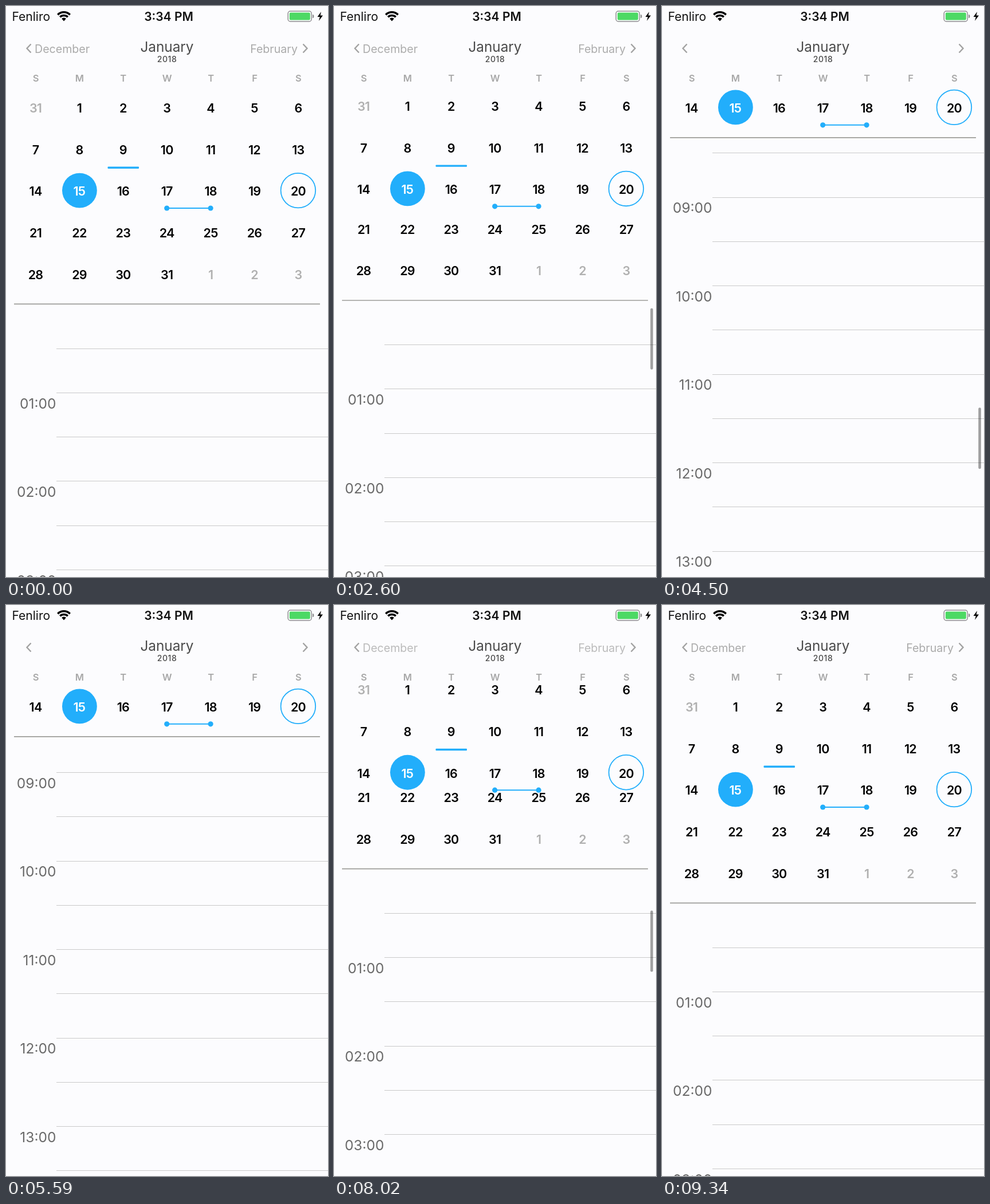
An HTML page with a canvas that plays this animation: 562 by 997 pixels, repeating every 9.41 s.

```html
<!DOCTYPE html>
<html lang="en">
<head>
<meta charset="utf-8">
<title>Collapsing calendar</title>
<style>
  html, body { margin: 0; height: 100%; overflow: hidden; background: #fcfcfe; }
  canvas { display: block; width: 562px; height: 997px; }
</style>
</head>
<body>
<canvas id="stage" width="562" height="997"></canvas>
<script>
const ctx = document.getElementById('stage').getContext('2d');
const LOOP = 9410;
const BG = '#fcfcfe', BLUE = '#22aefb', MUTED = '#aaaaaa';
const COL_X = 51.5, COL_W = 76.4;
const ROW_Y = 176.9, ROW_H = 72.6;
const GRID_TOP = 140, DIVIDER_Y = 520.3, COLLAPSE = 4 * ROW_H;
const HALF_HOUR = 77.25;
const SELECTED_ROW = 2;

const clamp = (v, lo, hi) => Math.min(hi, Math.max(lo, v));
const colX = col => COL_X + col * COL_W;

// Accelerating drag followed by exponential deceleration towards a limit.
function flick(t, from, limit, drag, tau) {
  const glide = (limit - from) / (1 + drag / (2 * tau));
  return t < drag
    ? from + glide * t * t / (2 * tau * drag)
    : limit - glide * Math.exp(-(t - drag) / tau);
}

function scrollAt(t) {
  if (t < 2600) return 0;
  if (t < 6380) return flick(Math.min(t, 5420) - 2600, 6.3, 1626.6, 280, 500);
  if (t < 9210) return Math.max(0, flick(t - 6380, 1612, -4.6, 200, 475));
  return 0;
}

function indicatorAlpha(t) {
  if (t < 2600) return 0;
  if (t < 6380) return clamp((5590 - t) / 160, 0, 1);
  return clamp((9340 - t) / 120, 0, 1);
}

function text(str, x, yMid, size, weight, color, align = 'center', spacing = 0) {
  ctx.font = `${weight} ${size}px Inter, sans-serif`;
  ctx.letterSpacing = spacing + 'px';
  ctx.textAlign = align;
  ctx.fillStyle = color;
  ctx.fillText(str, x, yMid + size * 0.3635);
}

function line(points, width, color) {
  ctx.beginPath();
  points.forEach(([x, y]) => ctx.lineTo(x, y));
  ctx.lineWidth = width;
  ctx.strokeStyle = color;
  ctx.stroke();
}

function circle(x, y, r) {
  ctx.beginPath();
  ctx.arc(x, y, r, 0, Math.PI * 2);
}

function disc(x, y, r, color) {
  circle(x, y, r);
  ctx.fillStyle = color;
  ctx.fill();
}

function box(x, y, w, h, r, color) {
  ctx.beginPath();
  ctx.roundRect(x, y, w, h, r);
  ctx.fillStyle = color;
  ctx.fill();
}

function drawStatusBar() {
  text('Fenliro', 10.5, 18.5, 21, 400, '#111', 'left');
  text('3:34 PM', 284, 18.5, 21, 600, '#111');

  const a0 = -Math.PI * 0.75, a1 = -Math.PI * 0.25;
  ctx.strokeStyle = ctx.fillStyle = '#000';
  ctx.lineWidth = 3.5;
  for (const r of [15.2, 9.6]) {
    ctx.beginPath();
    ctx.arc(101, 26, r, a0, a1);
    ctx.stroke();
  }
  ctx.beginPath();
  ctx.moveTo(101, 26.5);
  ctx.arc(101, 26, 5.5, a0, a1);
  ctx.fill();

  ctx.beginPath();
  ctx.roundRect(492.2, 9, 41, 18, 4);
  ctx.lineWidth = 1.5;
  ctx.strokeStyle = '#8e8e90';
  ctx.stroke();
  box(494.8, 11.5, 36, 13, 2, '#4cd964');
  box(535, 15, 2.4, 6, [0, 2, 2, 0], '#8e8e90');

  ctx.beginPath();
  [[550, 10], [543.5, 19], [547.8, 19], [546, 26], [553, 16.5], [548.6, 16.5]]
    .forEach(([x, y]) => ctx.lineTo(x, y));
  ctx.fillStyle = '#000';
  ctx.fill();
}

function drawHeader(collapse) {
  line([[43.5, 66.5], [36.5, 74], [43.5, 81.5]], 2.4, '#a2a2a2');
  line([[518.5, 66.5], [525.5, 74], [518.5, 81.5]], 2.4, '#a2a2a2');
  ctx.globalAlpha = 1 - collapse / COLLAPSE;
  text('December', 50, 74.5, 19.6, 400, MUTED, 'left');
  text('February', 509, 74.5, 19.6, 400, MUTED, 'right');
  ctx.globalAlpha = 1;
  text('January', 281, 71, 24.3, 400, '#4a4a4a');
  text('2018', 281, 93, 14, 500, '#4a4a4a', 'center', 0.6);
  [...'SMTWTFS'].forEach((day, col) => text(day, colX(col) + 0.5, 126.5, 16.5, 600, '#a8a8a8'));
}

function drawMarks(row, y) {
  if (row === 1) box(177.5, y + 31.1, 54.5, 3.4, 1, BLUE);
  if (row !== SELECTED_ROW) return;
  disc(colX(1) + 0.5, y, 30.4, BLUE);
  circle(colX(6), y, 30.3);
  ctx.lineWidth = 1.8;
  ctx.strokeStyle = BLUE;
  ctx.stroke();
  line([[colX(3), y + 30.9], [colX(4), y + 30.9]], 2, BLUE);
  disc(colX(3), y + 30.9, 4.6, BLUE);
  disc(colX(4), y + 30.9, 4.6, BLUE);
}

function drawWeek(row, y) {
  drawMarks(row, y);
  for (let col = 0; col < 7; col++) {
    const n = row * 7 + col;
    const inMonth = n >= 1 && n <= 31;
    const day = inMonth ? n : n < 1 ? 31 : n - 31;
    const color = n === 15 ? '#fff' : inMonth ? '#000' : '#b0b0b0';
    text(day, colX(col), y + 1.5, 21.5, 600, color, 'center', -0.8);
  }
}

function drawGrid(collapse) {
  ctx.save();
  ctx.beginPath();
  ctx.rect(0, GRID_TOP, 562, DIVIDER_Y - collapse - GRID_TOP);
  ctx.clip();
  const rowY = row => ROW_Y + row * ROW_H - collapse * (row > SELECTED_ROW ? 1 : 0.5);
  drawWeek(3, rowY(3));
  drawWeek(4, rowY(4));
  // Later weeks slide underneath the opaque upper weeks.
  ctx.fillStyle = BG;
  ctx.fillRect(0, 0, 562, rowY(SELECTED_ROW) + 35);
  for (let row = 0; row <= SELECTED_ROW; row++) drawWeek(row, rowY(row));
  ctx.restore();
}

function drawTimeline(scroll, top) {
  ctx.save();
  ctx.beginPath();
  ctx.rect(0, top, 562, 997 - top);
  ctx.clip();
  for (let i = 1; i < 48; i++) {
    const y = DIVIDER_Y + 0.3 + i * HALF_HOUR - scroll;
    if (y < top - 40 || y > 1000) continue;
    ctx.fillStyle = '#c9c9c9';
    ctx.fillRect(88, Math.round(y - 0.3), 474, 1);
    if (i % 2 === 0) {
      const hour = String(i / 2).padStart(2, '0');
      text(hour + ':00', 87.4, y + 18.6, 24.5, 400, '#6a6a6a', 'right');
    }
  }
  ctx.restore();
  line([[14, top], [548, top]], 1.7, '#9c9c98');
}

function draw(t) {
  const scroll = scrollAt(t);
  const collapse = Math.min(scroll, COLLAPSE);
  ctx.fillStyle = BG;
  ctx.fillRect(0, 0, 562, 997);
  drawStatusBar();
  drawHeader(collapse);
  drawGrid(collapse);
  drawTimeline(scroll, DIVIDER_Y - collapse);
  ctx.globalAlpha = indicatorAlpha(t);
  box(552.2, 527 + scroll * 0.1105, 4.6, 107, 2.3, 'rgba(0,0,0,.37)');
  ctx.globalAlpha = 1;
}

function tick() {
  draw(performance.now() % LOOP);
  requestAnimationFrame(tick);
}
tick();
</script>
</body>
</html>
```
